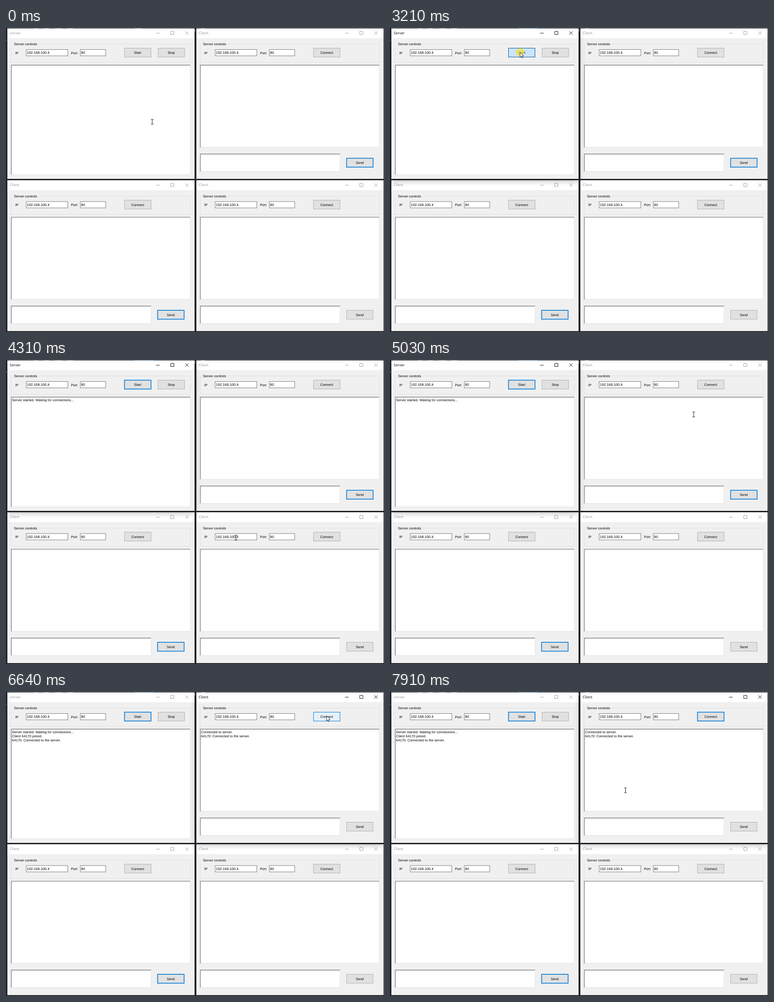
Animation of 834 by 671 pixels, one loop 8 s. Source, as an HTML page:

```html
<!DOCTYPE html>
<html lang="en">
<head>
<meta charset="utf-8">
<title>Server and clients</title>
<style>
  html, body { margin: 0; width: 100%; height: 100%; overflow: hidden; }
  body { position: relative; background: #23272d; }
  .window { position: absolute; width: 413px; background: #f0f0f0; overflow: visible;
    box-shadow: 0 1px 4px rgba(0,0,0,.25); }
  .window.top { z-index: 1; }
  .window.active { z-index: 2; box-shadow: 0 4px 12px rgba(0,0,0,.32); }
  .window svg { display: block; width: 100%; height: 100%; overflow: hidden; }
  #overlay { position: absolute; left: 0; top: 0; z-index: 3; }
  text { font: 7.55px "Liberation Sans", Arial, sans-serif; fill: #000;
    text-rendering: geometricPrecision; white-space: pre; }
  .title { font: 8px "Open Sans", sans-serif; fill: #999; }
  .glyph { fill: none; stroke: #999; stroke-width: .9; }
  .active .title { fill: #000; }
  .active .glyph { stroke: #000; }
  .group { fill: none; stroke: #dcdcdc; stroke-width: .8; }
  .field { fill: #fff; stroke: #7a7a7a; stroke-width: 1; }
  .value { font-size: 7.8px; }
  .button rect { fill: #e1e1e1; stroke: #adadad; stroke-width: 1; }
  .button text { text-anchor: middle; }
  .button.focus rect { stroke: #0078d7; stroke-width: 1.6; }
  .button.hover rect { fill: #e5f1fb; stroke: #0078d7; stroke-width: 1; }
  .button.pressed rect { fill: #cce4f7; stroke: #005499; stroke-width: 1; }
</style>
</head>
<body>
<svg id="overlay" width="834" height="671">
  <g fill="#8b9097" opacity=".6">
    <rect x="62" width="8" height="1"/><rect x="84" width="12" height="1"/>
    <rect x="108" width="16" height="1"/><rect x="135" width="14" height="1"/>
    <rect x="284" width="15" height="1"/><rect x="430" width="9" height="1"/>
    <rect x="0" y="25" width="1.5" height="4"/><rect x="416" y="3" width="2" height="5"/>
  </g>
  <rect id="taskMark" x="293" width="33" height="1" fill="#35618e"/>
  <circle id="click" r="9" fill="#efe23c" fill-opacity=".78"/>
  <path id="arrow" d="M0 0V11.2L2.6 8.8 4.3 12.6 6 11.8 4.4 8.1H7.8Z" fill="#fff" stroke="#000" stroke-width=".8"/>
  <path id="beam" d="M-2.8-5.5H-.8L0-5 .8-5.5H2.8M0-5V5M-2.8 5.5H-.8L0 5 .8 5.5H2.8" fill="none" stroke="#000" stroke-width=".95"/>
</svg>
<script>
const LOOP = 8000, COL = 417, ROW = 335.6;
const byId = id => document.getElementById(id);

const label = (x, y, str, cls = '') => `<text class="${cls}" x="${x}" y="${y}">${str}</text>`;
const field = (x, w, str) =>
  `<rect class="field" x="${x}" y="47.5" width="${w}" height="14"/>` + label(x + 1.6, 57.2, str, 'value');
const button = (x, y, str, cls = '') =>
  `<g class="button ${cls}"><rect x="${x}" y="${y}" width="58.4" height="19.6"/>` +
  label(x + 29, y + 12.7, str) + '</g>';
const sunken = (w, y, h) =>
  `<rect x="11" y="${y}" width="${w}" height="${h}" fill="#fff"/>` +
  `<path d="M${11 + w} ${y}V${y + h}H11" fill="none" stroke="#e3e3e3"/>` +
  `<path d="M11.7 ${y + h}V${y + .7}H${11 + w}" fill="none" stroke="#808080" stroke-width="1.4"/>`;

function makeWindow(col, row, sendClass) {
  const server = !col && !row;
  const el = document.createElement('div');
  el.className = row ? 'window' : 'window top';
  el.style.cssText = `left:${3 + COL * col}px;top:${row ? 336 : 1}px;height:${row ? 333 : 332}px`;
  el.innerHTML = `<svg viewBox="3 ${row ? .4 : 1} 413 ${row ? 333 : 332}">
    <rect x="3" y="0" width="413" height="22.3" fill="#fff"/>
    ${label(8.3, 13.9, server ? 'Server' : 'Client', 'title')}
    <path class="glyph" d="M331 11.4H339M363.5 7.5H370.5V14.5H363.5ZM395.5 7.3L403 14.8M403 7.3L395.5 14.8"/>
    <path class="group" d="M16 35.5H11.5V75.8H406.8V35.5H70"/>
    ${label(17.7, 38, 'Server controls')}
    ${label(20.3, 57.6, 'IP')}${field(44.5, 92, '192.168.100.4')}
    ${label(143.5, 57.6, 'Port')}${field(164, 56, '80')}
    ${button(261.5, 44.5, server ? 'Start' : 'Connect')}
    ${server ? button(335.6, 44.5, 'Stop') : ''}
    ${sunken(395.5, 81.3, server ? 242.5 : 182)}
    ${server ? '' : sunken(309, 277.5, 39) + button(334.5, 287.5, 'Send', sendClass)}
    <g class="log"></g></svg>`;
  document.body.append(el);
  const buttons = el.querySelectorAll('.button');
  return { el, main: buttons[0], send: buttons[1], log: el.querySelector('.log') };
}

const server = makeWindow(0, 0);
const client = makeWindow(1, 0, 'focus');
makeWindow(0, 1, 'focus');
makeWindow(1, 1);

function fillLog(win, lines) {
  win.log.innerHTML = lines.map((s, i) => label(13.3, 90.9 + 9.2 * i, s)).join('');
  win.lines = [...win.log.children];
}
fillLog(server, ['Server started. Waiting for connections...', 'Client 64170 joined.', '64170: Connected to the server.']);
fillLog(client, ['Connected to server.', '64170: Connected to the server.']);

// Pointer moves: first step, last step, step count, bend point, end point
const START = [322.5, 207];
const MOVES = [
  [70, 270, 3, [316, 203], [309.5, 199]],
  [480, 480, 1, [309, 199], [308.7, 199]],
  [2330, 3080, 12, [303, 120], [287, 53.5]],
  [3610, 4013, 7, [350, 330], [570, 466]],
  [4080, 4350, 5, [443, 408], [515, 390]],
  [4430, 5170, 12, [610, 240], [686, 89]],
  [5240, 5570, 6, [695, 68], [707.7, 52.5]],
  [6640, 7400, 12, [680, 80], [636.5, 123]],
  [7450, 7910, 8, [590, 185], [519.5, 217]],
];
const ease = u => u * u * u * (u * (6 * u - 15) + 10);

function pointerAt(t) {
  let from = START;
  for (const [first, last, steps, bend, to] of MOVES) {
    if (t < first) break;
    if (t < last) {
      const gap = (last - first) / (steps - 1);
      const u = ease((Math.floor((t - first) / gap) + 1) / steps), v = 1 - u;
      return from.map((a, i) => v * v * a + 2 * u * v * bend[i] + u * u * to[i]);
    }
    from = to;
  }
  return from;
}

const within = (x, y, l, t, r, b) => x >= l && x <= r && y >= t && y <= b;

function overText(x, y) {
  const isServer = x < COL && y < ROW;
  const lx = x % COL, ly = y % ROW;
  return within(lx, ly, 11, 81, 407, isServer ? 324 : 264) ||
    within(lx, ly, 44, 47, 137, 62) || within(lx, ly, 163, 47, 221, 62) ||
    (!isServer && within(lx, ly, 11, 277, 320, 317));
}

const show = (el, on) => el.setAttribute('visibility', on ? 'visible' : 'hidden');
const place = (el, x, y) => el.setAttribute('transform', `translate(${x} ${y})`);

function setButton(win, left, [x, y], t, down, up) {
  const state = t >= down && t < up ? 'pressed'
    : within(x, y, left, 44, left + 59, 64.5) ? 'hover'
    : t >= down ? 'focus' : '';
  win.main.setAttribute('class', 'button ' + state);
}

function draw(now) {
  const t = now % LOOP;
  const pos = pointerAt(t);
  const clicking = (t >= 3210 && t < 3410) || (t >= 6050 && t < 6240);
  const beam = overText(...pos);

  server.el.classList.toggle('active', t >= 3210 && t < 6050);
  client.el.classList.toggle('active', t >= 6050);
  setButton(server, 261, pos, t, 3210, 3410);
  setButton(client, 261 + COL, pos, t, 6050, 6240);
  client.send.classList.toggle('focus', t < 6050);

  server.lines.forEach((line, i) => show(line, t >= (i ? 6240 : 3470)));
  client.lines.forEach(line => show(line, t >= 6240));

  show(byId('taskMark'), t >= 3210);
  show(byId('click'), clicking);
  show(byId('beam'), beam);
  show(byId('arrow'), !beam);
  for (const id of ['click', 'beam', 'arrow']) place(byId(id), ...pos);
}

const origin = performance.now();
function tick() {
  draw(performance.now() - origin);
  requestAnimationFrame(tick);
}
tick();
</script>
</body>
</html>
```
